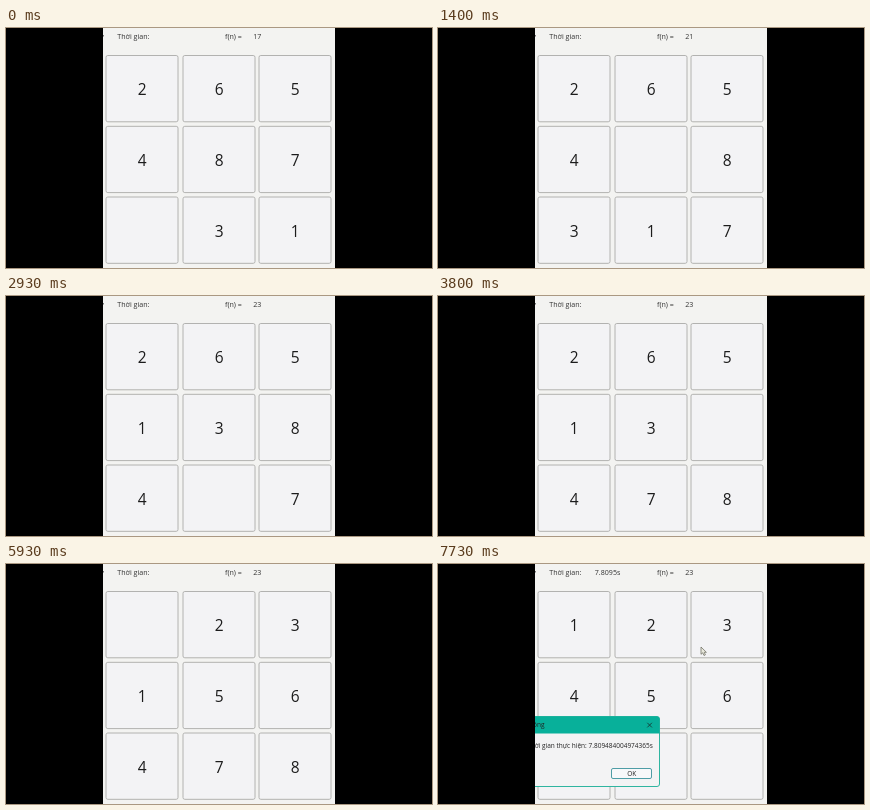
These frames come from a looping animation (426 by 240 pixels, 7790 ms). An HTML page:

```html
<!DOCTYPE html>
<html lang="vi">
<head>
<meta charset="utf-8">
<title>8-puzzle</title>
<style>
  html, body { margin: 0; height: 100%; overflow: hidden; background: #000; }
  svg { display: block; width: 100vw; height: 100vh; }
  text { font-family: "Open Sans", "Noto Sans", sans-serif; font-size: 7.1px; fill: #333; white-space: pre; }
  .tile rect { fill: #f3f3f5; stroke: #b2b2b0; stroke-width: 1; }
  .tile text { font-size: 15.5px; text-anchor: middle; fill: #1c1c1c; }
  #dialog text { font-size: 6.5px; fill: #222; }
  .end { text-anchor: end; }
</style>
</head>
<body>
<svg viewBox="0 0 426 240">
  <defs><clipPath id="window"><rect x="97" width="232" height="240"/></clipPath></defs>
  <rect width="426" height="240" fill="#000"/>
  <g clip-path="url(#window)">
    <rect x="97" width="232" height="240" fill="#f3f3f1"/>
    <rect x="97" y="7" width="1" height="1.5" fill="#777"/>
    <text x="111.3" y="11">Thời gian:</text>
    <text x="156.8" y="11" id="elapsed">7.8095s</text>
    <text x="219" y="11">f(n) =</text>
    <text x="247.3" y="11" id="cost"></text>
    <g id="board"></g>
    <g id="dialog">
      <path d="M90 152.5H219Q221.5 152.5 221.5 155V220Q221.5 222.5 219 222.5H90Z" fill="#f3f3f4" stroke="#2fb5a0"/>
      <path d="M90 152.5H219Q221.5 152.5 221.5 155V169.5H90Z" fill="#08b09a"/>
      <text x="106.6" y="163.3" class="end">Thành công</text>
      <path d="M209.3 158.8l4.6 4.6m0-4.6l-4.6 4.6" stroke="#163c38" stroke-width=".9"/>
      <text x="214.8" y="183.5" class="end">Thời gian thực hiện: 7.809484004974365s</text>
      <rect x="173.5" y="204.5" width="40" height="10" rx="1.5" fill="#f8f8fa" stroke="#4f9da6"/>
      <text x="193.7" y="212" text-anchor="middle">OK</text>
    </g>
    <path id="pointer" d="M263 83V90.3L264.7 88.8L266 91.5L267.4 90.8L266.2 88.3H268.4Z" fill="#e8e8dc" stroke="#66665a" stroke-width=".7"/>
  </g>
</svg>
<script>
  const LOOP = 7790, STEP = 339.5, LEAD = 235, DONE = 7574;
  const START = "265487031";
  const PATH = "RRULDLURDRUULDRULLDDRR"; // moves of the empty cell
  const SHIFT = { R: 1, L: -1, U: -3, D: 3 };
  const $ = id => document.getElementById(id);

  function slide(state, move) {
    const cells = [...state], from = cells.indexOf("0"), to = from + SHIFT[move];
    [cells[from], cells[to]] = [cells[to], cells[from]];
    return cells.join("");
  }

  const states = [START];
  for (const move of PATH) states.push(slide(states.at(-1), move));

  // Manhattan distance to the solved board
  function distance(state) {
    return [...state].reduce((sum, digit, i) => {
      if (digit === "0") return sum;
      const goal = digit - 1;
      return sum + Math.abs(goal % 3 - i % 3) +
        Math.abs(Math.floor(goal / 3) - Math.floor(i / 3));
    }, 0);
  }

  function add(parent, name, attrs) {
    const el = document.createElementNS("http://www.w3.org/2000/svg", name);
    for (const key in attrs) el.setAttribute(key, attrs[key]);
    return parent.appendChild(el);
  }

  const columns = [100, 177, 253], rows = [27.5, 98.3, 169];
  const labels = [...START].map((_, i) => {
    const x = columns[i % 3], y = rows[Math.floor(i / 3)];
    const tile = add($("board"), "g", { class: "tile" });
    add(tile, "rect", { x, y, width: 72, height: 66.3, rx: 1.8 });
    return add(tile, "text", { x: x + 36.3, y: y + 39.8 });
  });

  let shown = -1;
  function draw(t) {
    const step = Math.min(PATH.length, Math.floor((t + LEAD) / STEP));
    if (step !== shown) {
      shown = step;
      [...states[step]].forEach((digit, i) => {
        labels[i].textContent = digit === "0" ? "" : digit;
      });
      $("cost").textContent = step + 1 + distance(states[step]);
    }
    for (const id of ["elapsed", "dialog", "pointer"])
      $(id).style.display = t >= DONE ? "" : "none";
  }

  const begin = performance.now();
  function tick() {
    draw((performance.now() - begin) % LOOP);
    requestAnimationFrame(tick);
  }
  tick();
</script>
</body>
</html>
```
